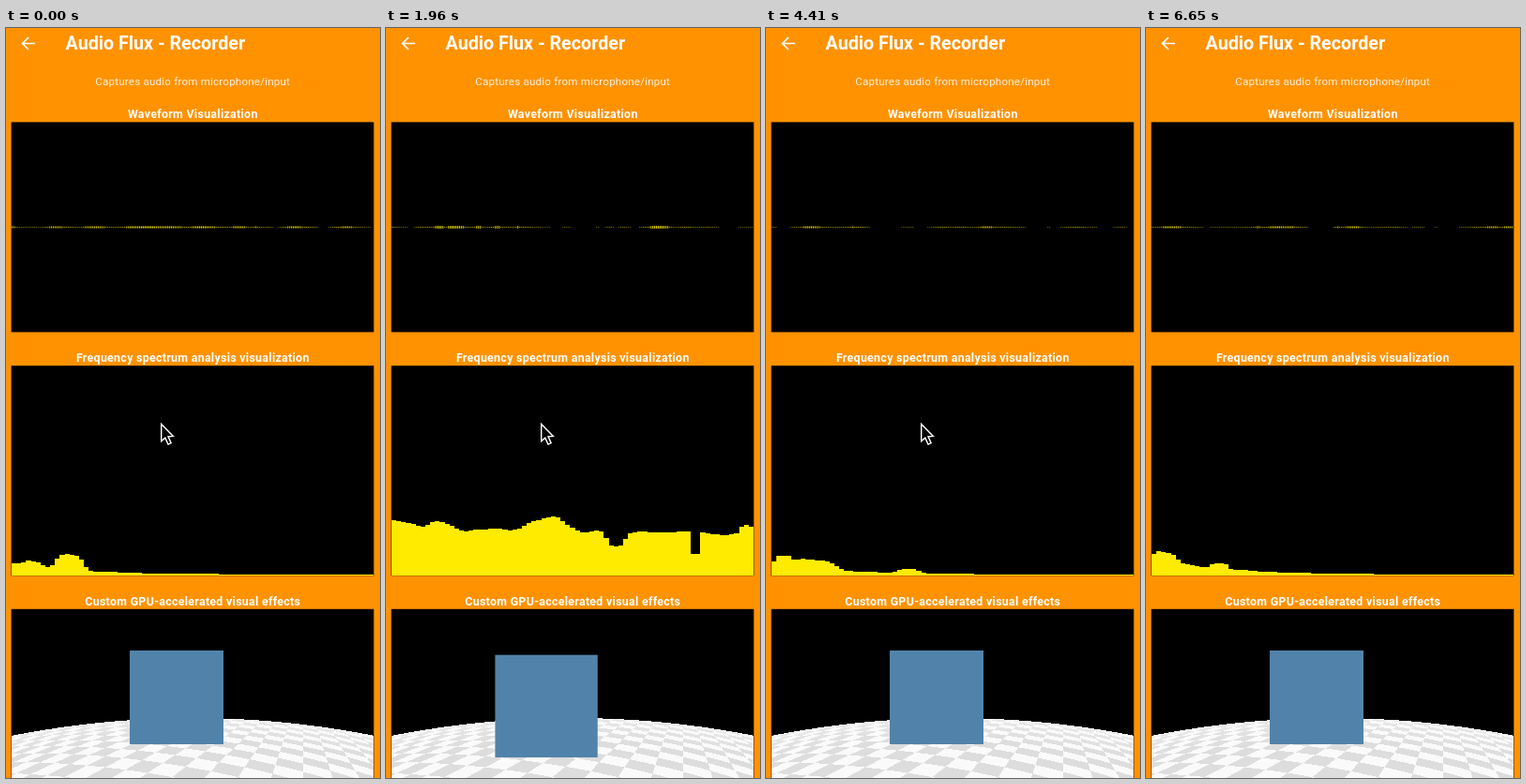
An HTML page with a canvas that plays this animation: 399 px wide and 800 px high, repeating every 6.72 s.

```html
<!DOCTYPE html>
<html lang="en">
<head>
<meta charset="utf-8">
<title>Audio Flux - Recorder</title>
<style>
  html, body { margin: 0; width: 100%; height: 100%; overflow: hidden; background: #ff9200; }
  canvas, svg { position: absolute; left: 0; top: 0; }
  text { font-family: Roboto, sans-serif; fill: #fff; }
  .title { font-size: 19.7px; font-weight: 600; }
  .note { font-size: 11.58px; letter-spacing: .207px; text-anchor: middle; opacity: .88; }
  .head { font-size: 12.4px; font-weight: 700; letter-spacing: .3px; text-anchor: middle; }
</style>
</head>
<body>
<canvas id="stage" width="399" height="800"></canvas>
<svg width="399" height="800" viewBox="0 0 399 800">
  <path d="M31 16.5H18M24 10l-6.4 6.5 6.4 6.5" fill="none" stroke="#fff" stroke-width="1.7"/>
  <text class="title" x="63.5" y="23">Audio Flux - Recorder</text>
  <text class="note" x="199.2" y="61.3">Captures audio from microphone/input</text>
  <text class="head" x="199.3" y="96.3">Waveform Visualization</text>
  <text class="head" x="199.3" y="356">Frequency spectrum analysis visualization</text>
  <text class="head" x="199.3" y="615.5">Custom GPU-accelerated visual effects</text>
  <path id="cursor" d="M.7 1V19.2l4.1-3.6 3.2 7 3.1-1.4-3.1-6.8 5.4-.5z" fill="#000" stroke="#fff" stroke-width="1.4"/>
</svg>
<script>
const ctx = document.getElementById('stage').getContext('2d');
const cursor = document.getElementById('cursor');
const LOOP = 6720, STEP = 70, BARS = 75, LEFT = 6, WIDTH = 386, BASE = 584;

// A spectrum pose: a floor level, a bass tail, and bumps [bar, height, half width].
const pose = (at, loud, level, tail, ...bumps) => ({ at, loud, level, tail, bumps });
const poses = [
  pose(0, 0, 1, 12, [4, 5, 2], [11.5, 16, 3.2]),
  pose(18, .02, 2, 20, [4.5, 6, 3.5], [13.5, 15, 2.6], [48, 5, 5]),
  pose(28, .78, 46, 10, [10, 5, 3], [32, 13, 5.5], [46, -14, 2], [62.5, -28, .8], [73, 10, 1.5]),
  pose(47, 1, 48, 12, [6.7, -52, 2.2], [12.5, -44, .7], [28, 53, 20], [31, -32, .5], [56, 38, 2.8], [68.8, -20, 2]),
  pose(63, 0, 1, 13, [2, 8, 1.7], [8.5, 9, 5], [28, 4, 2.5]),
  pose(79, 0, 2, 11, [11, 4, 5]),
  pose(95, 0, 1, 19, [2.5, 9, 2.5], [13.5, 6, 2])
];
poses.push({ ...poses[0], at: LOOP / STEP });

const mix = (a, b, k) => a + (b - a) * k;
const clamp = v => Math.max(0, Math.min(1, v));

function rand(a, b) {
  const s = Math.sin(a * 127.1 + b * 311.7) * 43758.5453;
  return s - Math.floor(s);
}

function noise(x, seed) {
  const i = Math.floor(x), f = x - i;
  return mix(rand(i, seed), rand(i + 1, seed), f * f * (3 - 2 * f));
}

function heightAt(p, bar) {
  const bumps = p.bumps.reduce((sum, [at, h, w]) => sum + h * Math.exp(-(((bar - at) / w) ** 4)), 0);
  return Math.max(1, p.level + p.tail * Math.exp(-bar / 13) + bumps);
}

function box(color, x, y, w, h) {
  ctx.fillStyle = color;
  ctx.fillRect(x, y, w, h);
}

// Checkered dome, painted once.
function makeFloor() {
  const floor = document.createElement('canvas');
  floor.width = WIDTH;
  floor.height = 70;
  const g = floor.getContext('2d');
  for (let x = 0; x < WIDTH; x++) {
    const dx = x + LEFT - 199, top = 5.5 + dx * dx / 1980;
    for (let y = Math.ceil(top); y < 70; y++) {
      const d = y - top + 45, u = dx * 3.4 / d, v = 864 / d;
      const odd = (Math.floor(u * .91 - v * .42) + Math.floor(u * .42 + v * .91)) & 1;
      const shade = 250 - (odd ? 29 * clamp(1.3 - 1500 / d / d) : 0);
      g.fillStyle = `rgb(${shade},${shade},${shade})`;
      g.fillRect(x, y, 1, 1);
    }
  }
  return floor;
}
const floor = makeFloor();

function drawWave(step, loud) {
  for (let x = LEFT; x < LEFT + WIDTH; x += 2) {
    const level = noise(x / 24, step + 1) * .75 + noise(x / 7, step + 50) * .35;
    if (level < .32) continue;
    const h = level > .72 ? 2 + loud : 1;
    box(`rgba(255,235,0,${clamp(level * .95)})`, x, 212.5 - h / 2, 1.3, h);
  }
}

function drawSpectrum(step, a, b, k) {
  const w = WIDTH / BARS, sway = .06 + .24 * Math.sin(Math.PI * k);
  for (let i = 0; i < BARS; i++) {
    const h = mix(heightAt(a, i), heightAt(b, i), k);
    const wobble = 1 + sway * (noise(i / 3, step + 200) * 2 - 1);
    const x = Math.round(LEFT + i * w), end = Math.round(LEFT + (i + 1) * w);
    const y = Math.round(BASE - h * wobble);
    box('#ffeb00', x, y, end - x, BASE - y);
  }
}

function draw(time) {
  const step = Math.floor(time % LOOP / STEP);
  const n = poses.findIndex(p => p.at > step);
  const a = poses[n - 1], b = poses[n];
  const k = (step - a.at) / (b.at - a.at), loud = mix(a.loud, b.loud, k);

  box('#ff9200', 0, 0, 399, 800);
  for (const y of [100.4, 360.2, 619.8]) box('#000', LEFT - .4, y, WIDTH + .8, 224);
  drawWave(step, loud);
  drawSpectrum(step, a, b, k);
  ctx.drawImage(floor, LEFT, 730);
  const side = mix(100, 112, loud);
  box('#5183aa', mix(182, 168, loud) - side / 2, mix(714, 726, loud) - side / 2, side, side);

  const move = clamp((step - 73) / 5);
  cursor.setAttribute('transform', `translate(${mix(165, 188, move)} ${mix(421.5, 439.8, move)})`);
  cursor.style.display = step < 85 ? '' : 'none';
}

const start = performance.now();
function tick() {
  draw(performance.now() - start);
  requestAnimationFrame(tick);
}
tick();
</script>
</body>
</html>
```
